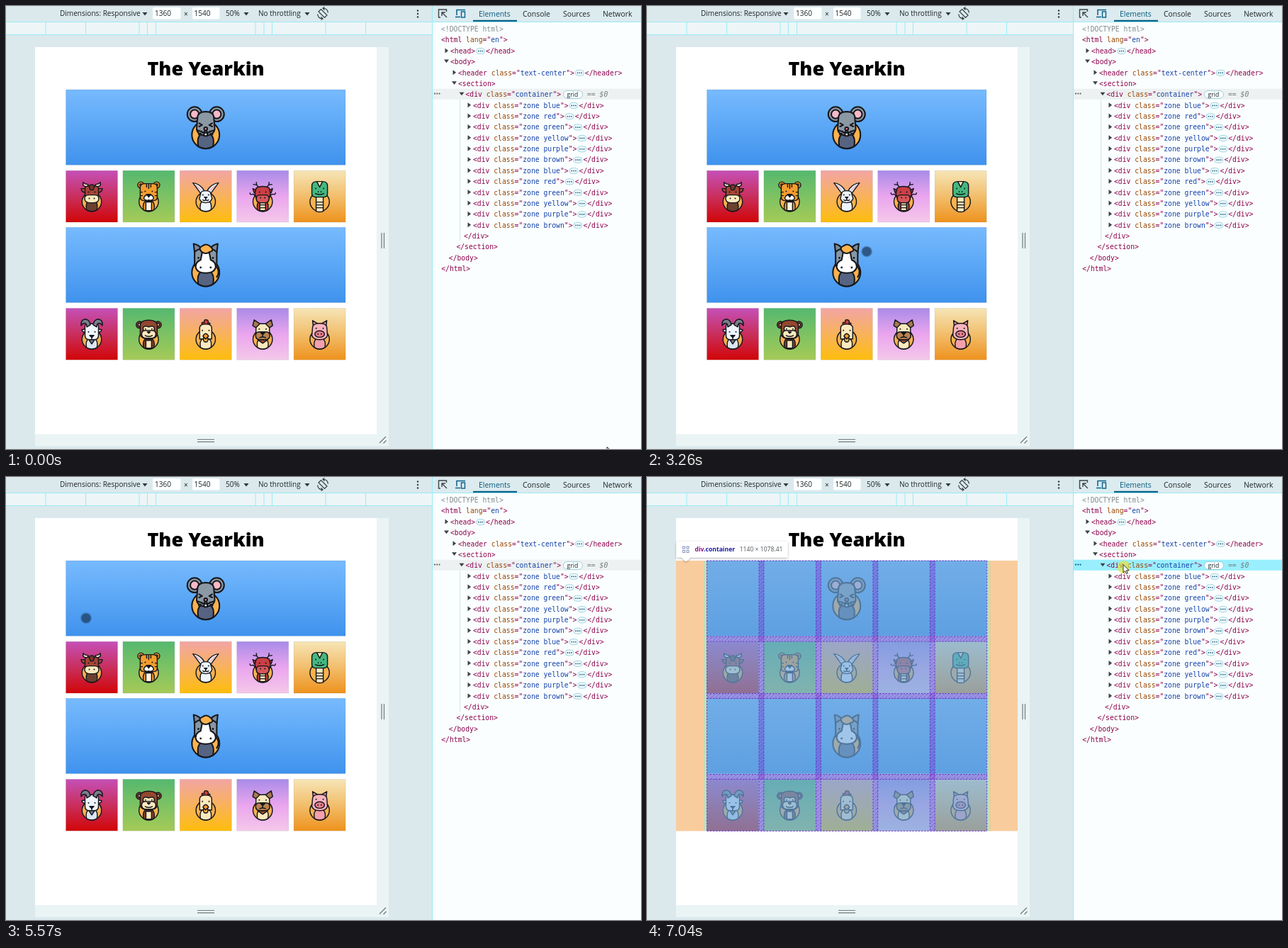
Write an HTML page that moves like this. It is 896 px wide and 625 px high and loops after 8 s.

```html
<!DOCTYPE html>
<html lang="en">
<head>
<meta charset="utf-8">
<title>Grid inspector</title>
<style>
html, body { margin: 0; width: 100%; height: 100%; overflow: hidden; background: #dbe9ed; }
svg { display: block; width: 896px; height: 625px; }
text { font: 10.05px "Open Sans", "Noto Sans", sans-serif; fill: #1f2528; white-space: pre; }
.tab { font-size: 10.4px; }
.code text { font: 9.72px "DejaVu Sans Mono", monospace; }
.title { font-size: 27px; font-weight: 800; fill: #000; }
.tip text { font-size: 8.6px; fill: #50565a; }
.tip .sel { font-weight: 700; }
.icon { stroke: #15171c; stroke-width: 1.45; stroke-linejoin: round; stroke-linecap: round; }
</style>
</head>
<body>
<svg id="stage" viewBox="0 0 896 625"></svg>
<script>
const LOOP = 8000, ROW0 = 32.7, ROW = 15.36;
const rect = (x, y, w, h, fill, more = '') =>
  `<rect x="${x}" y="${y}" width="${w}" height="${h}" fill="${fill}" ${more}/>`;
const path = (d, fill = 'none', more = '') => `<path d="${d}" fill="${fill}" ${more}/>`;
const disc = (x, y, r, fill, more = '') => `<circle cx="${x}" cy="${y}" r="${r}" fill="${fill}" ${more}/>`;
const line = (d, color, w = 1, more = '') => path(d, 'none', `stroke="${color}" stroke-width="${w}" ${more}`);
const text = (x, y, s, more = '') => `<text x="${x}" y="${y}" ${more}>${s}</text>`;
const esc = s => s.replace(/</g, '&lt;').replace(/>/g, '&gt;');
const span = (s, color) => `<tspan fill="${color}">${esc(s)}</tspan>`;
const rowY = i => ROW0 + ROW * i;

// ---- animal icons, centred on the origin ----
const INK = '#15171c', CREAM = '#fde9bd', GOLD = '#fbb24e';
const badge = disc(0, 7.5, 13.7, GOLD);
const body = fill => path('M-7.4 19Q-9 10 -5 7H5Q9 10 7.4 19Q0 23.4 -7.4 19Z', fill);
const head = fill => path('M-9.5 -11Q-9.5 -14.5 -5 -14.5H5Q9.5 -14.5 9.5 -11V2Q9.5 8 3 8H-3Q-9.5 8 -9.5 2Z', fill);
const dots = (dx, y, r = 1) => [-dx, dx].map(x => disc(x, y, r, INK, 'stroke="none"')).join('');
const pair = s => s + `<g transform="scale(-1 1)">${s}</g>`;
const muzzle = (fill, y = 2, w = 9) => path(`M${-w} ${y}Q${-w} ${y - 5} -4 ${y - 5}H4Q${w} ${y - 5} ${w} ${y}Q${w} ${y + 6} 3 ${y + 6}H-3Q${-w} ${y + 6} ${-w} ${y}Z`, fill);

const ICONS = {
  rat: badge + body('#566482') + pair(disc(-11, -13, 7.3, '#8c99a5') + disc(-11, -13, 4.3, '#f7b9c8')) +
    path('M-8 -11Q-7 -15.5 0 -15.5Q7 -15.5 8 -11L9 2Q8 8 0 8Q-8 8 -9 2Z', '#8c99a5') +
    pair(path('M-6.5 -4L-3.5 -2.3L-6.5 -.8') + path('M-5 4L-8 3M-5 6L-7 7')) +
    path('M-1.6 5.5H1.6V8.5H-1.6Z', '#fff') + path('M0 3Q-3 7 -4 4M0 3Q3 7 4 4') + disc(0, 1.5, 1.6, '#f3849d'),
  ox: badge + body('#6b4030') + pair(path('M-6 -14Q-14 -13 -12 -20Q-10 -17 -5 -17Z', '#f2e3cb') +
    path('M-9 -11L-15 -11Q-14 -5 -9 -6Z', '#b24a38')) + head('#a84436') +
    path('M-4 -14.5Q0 -19 4 -14.5L2 -9H-2Z', '#72382f') + dots(4.5, -6) + muzzle(CREAM, 3, 10) + dots(3.5, 3),
  tiger: badge + body('#f39a2c') + path('M-4 8H4V20H-4Z', '#fff5e5') +
    pair(disc(-11, -16, 4.5, '#f39a2c') + disc(-11, -16, 1.7, CREAM)) +
    path('M-12 -13Q-12 -18 -5 -18H5Q12 -18 12 -13V1Q12 6 7 6H-7Q-12 6 -12 1Z', '#f59d2e') +
    path('M-3 -17V-13M0 -17V-11M3 -17V-13M-12 -6H-9M12 -6H9M-12 -1H-9M12 -1H9') + dots(5, -7) +
    path('M-7 3Q-6 -3 0 -2Q6 -3 7 3Q4 7 0 5Q-4 7 -7 3Z', '#fff') + path('M-3 -3H3L0 1Z', INK),
  rabbit: badge + body('#eef4fb') + pair(path('M-7 -4L-18 -19Q-8 -18 -2 -8Z', '#eaf2fa') +
    path('M-7 -9L-13 -15', 'none', 'stroke="#f4a8b0"')) +
    path('M-7 -4Q-7 -8 0 -8Q7 -8 7 -4L9 3Q7 9 0 9Q-7 9 -9 3Z', '#eef4fb') + dots(4, -2) +
    path('M-2 1H2L0 3Z', '#e98c96') + path('M0 3V5M-4 5Q-2 7 0 5Q2 7 4 5'),
  dragon: badge + body('#c03a3e') + path('M-4 9H4V20H-4Z', CREAM) + path('M-4 12H4M-4 16H4') +
    pair(path('M-5 -13Q-9 -14 -9 -20M-8 -16L-13 -17') + path('M-9 -9L-14 -11L-12 -5L-9 -4Z', '#ae3038') +
    path('M-9 2Q-12 -4 -15 -3Q-18 -2 -18 -5')) +
    path('M-9 -12Q0 -16 9 -12L11 -4L8 7H-8L-11 -4Z', '#ca3f45') + dots(4.5, -6) + muzzle('#d9555a', 3) + dots(3, 2),
  snake: badge + path('M-5 0H5V21Q0 23 -5 21Z', CREAM) + path('M-5 8H5M-5 12H5M-5 16H5') +
    path('M-11 -15Q-11 -21 -4 -21H4Q11 -21 11 -15V-4Q11 1 6 1H-6Q-11 1 -11 -4Z', '#44b87f') +
    path('M-4 -21H4L0 -13Z', CREAM) + dots(5.5, -11) + path('M-6 -4Q0 -1 6 -4M-2 -7V-6M2 -7V-6'),
  horse: badge + body('#566482') + path('M10 1Q15 6 11 12', GOLD) +
    pair(path('M-11 -12L-12 -21Q-6 -20 -4 -15Z', '#7c8a97')) +
    path('M-11 -13Q-6 -17 0 -17Q6 -17 11 -13V0Q8 6 0 6Q-8 6 -11 0Z', '#8997a4') +
    path('M-3 -15H3L5 -5Q10 -3 10 2Q9 8 0 8Q-9 8 -10 2Q-10 -3 -5 -5Z', '#fff') +
    path('M-4 -13Q-8 -17 -3 -19Q1 -22 5 -18Q9 -14 4 -13Q0 -10 -4 -13Z', GOLD) + dots(7.2, -7) + dots(5, 2.5),
  goat: badge + body('#dce6f2') + pair(path('M-9 -7L-14 -6Q-13 -2 -9 -3Z', '#dce6f2')) + head('#edf4fc') +
    pair(path('M-2 -13Q-3 -20 -9 -21Q-16 -20 -15 -12Q-12 -16 -9 -15Q-7 -14 -7 -10Z', '#78818c')) +
    dots(4.5, -3) + path('M-3 2H3L0 5Z', INK) + path('M-4 8H4L0 14Z', '#77818d') + path('M0 5V7'),
  monkey: badge + body('#82432d') + path('M-4 9H4V20H-4Z', CREAM) +
    pair(disc(-13, -13, 4.7, '#94482f') + disc(-13, -13, 2.3, '#e8b791')) +
    path('M-12 -13Q-11 -19.5 0 -19.5Q11 -19.5 12 -13V1Q10 7 0 7Q-10 7 -12 1Z', '#93472f') +
    path('M-8 -8Q-7 -13 0 -10Q7 -13 8 -8L7 -3H-7Z', CREAM) + dots(4.5, -7) + muzzle(CREAM, 0, 10) +
    path('M-2 -3H2L0 -1Z', INK) + path('M-5 2Q0 5 5 2'),
  rooster: badge + body(CREAM) + path('M-5 -13Q-7 -18 -2 -16Q-3 -21 1 -20Q5 -19 3 -15Q8 -17 5 -12Z', '#cf3f3b') +
    path('M-8.5 -9Q-8 -14 0 -14Q8 -14 8.5 -9V7H-8.5Z', CREAM) + dots(4.7, -5) +
    path('M-3 5Q-4 12 0 11Q4 12 3 5L0 6Z', '#f3ad45') + path('M-4 3Q0 -4 4 3L0 7Z', '#f39b2d'),
  dog: badge + body(CREAM) + path('M-7 8L0 13L7 8L5 6H-5Z', '#ab4c35') + head(CREAM) +
    pair(path('M-4 -14.5L-12 -20L-14 -12L-9.5 -9Z', '#a87b50')) + dots(4.8, -7) + muzzle('#b8834f', 2, 10) +
    path('M-3 -2H3L0 1Z', INK) + path('M0 1V4M-4 5L0 4L4 5'),
  pig: badge + body('#f4a0ad') + pair(path('M-9 -10L-10 -19L-3 -15Z', '#f2909f')) +
    path('M-10 -10Q-9 -15 0 -15Q9 -15 10 -10L11 2Q9 8 0 8Q-9 8 -11 2Z', '#f8b3bf') + dots(5, -8) +
    `<ellipse cx="0" cy="0" rx="6.8" ry="4.6" fill="#ea7f90"/>` + dots(2.3, 0)
};

// ---- zones ----
const COLORS = {
  blue: ['#77bafe', '#5ba7f6', '#3f92ed'], red: ['#c550b8', '#c92f5d', '#d10507'],
  green: ['#55b86f', '#7dc263', '#a5ca57'], yellow: ['#f2a5a4', '#f8b25b', '#febd0c'],
  purple: ['#a98be8', '#eaa5ee', '#f5c8ea'], brown: ['#f6e5b6', '#f2be6c', '#ee921d']
};
const names = Object.keys(COLORS);
const colX = i => 84.5 + i * 80.4;
const zones = Object.keys(ICONS).map((icon, i) => {
  const big = i % 6 === 0, half = i < 6 ? 0 : 194.2;
  return { icon, big, cls: names[i % 6], x: big ? 84.5 : colX(i % 6 - 1),
    y: (big ? 118 : 232.2) + half, w: big ? 394.5 : 73, h: big ? 106.3 : 72.8 };
});
const gradients = names.map(n => `<linearGradient id="${n}" x2="0" y2="1">` +
  COLORS[n].map((c, i) => `<stop offset="${i / 2}" stop-color="${c}"/>`).join('') + '</linearGradient>').join('');
const drawZone = z => rect(z.x, z.y, z.w, z.h, `url(#${z.cls})`, 'stroke="#54606a" stroke-opacity=".2" stroke-width=".6"') +
  `<g class="icon" transform="translate(${z.x + z.w / 2} ${z.y + z.h / 2}) scale(${z.big ? 1.42 : 1})">${ICONS[z.icon]}</g>`;

// ---- device toolbar and page frame ----
const caret = x => path(`M${x - 3.5} 9h7l-3.5 4.5z`, '#30383c');
const cyan = '#9aebf5';
function device() {
  const ticks = [56, 112.5, 188, 199.5, 211.5].flatMap(x => [x, 563.5 - x]);
  return rect(0, 0, 601, 625, '#dbe9ed') + rect(0, 22, 601, 18, '#edf5f7') +
    line('M0 22.5H601M0 40.5H601', cyan) + line(ticks.map(x => `M${x} 22V40`).join(''), cyan) +
    text(76, 14.3, 'Dimensions: Responsive') + caret(196) +
    rect(207, 2, 39.5, 16.5, '#fcffff', 'rx="2"') + text(210, 14.3, '1360') +
    text(251, 15, '×') + rect(263, 2, 38.5, 16.5, '#fcffff', 'rx="2"') + text(265.5, 14.3, '1540') +
    text(310, 14.3, '50%') + caret(339) + text(356, 14.3, 'No throttling') + caret(425) +
    `<g transform="translate(447 10.5)">` +
    line('M-6 -2.5L-2.5 -6L6 2.5L2.5 6ZM0 -7.5Q7 -7 7.3 -1M0 7.5Q-7 7 -7.3 1M2.5 -9L0 -7.5L2.5 -5M-2.5 9L0 7.5L-2.5 5', '#30383c', 1.2) + '</g>' +
    [6.5, 11, 15.5].map(y => disc(581, y, 1.2, '#30383c')).join('') +
    rect(41, 58, 499, 563, '#eaf4f5') + rect(41, 58, 482, 546, '#fff') +
    line('M530 320V342M533.5 320V342M270 611.5H294M270 614.8H294M527 616.5L536 607.5M532.5 617L536.5 613', '#71797c', 1.2);
}

// ---- element tree ----
const markup = s => s.split(/("[^"]*"|\b(?:class|lang)=)/).map(p =>
  p[0] === '"' ? span('"', '#8e004b') + span(p.slice(1, -1), '#1440a8') + span('"', '#8e004b') :
  /=$/.test(p) ? span(p.slice(0, -1), '#994500') + span('=', '#8e004b') : span(p, '#8e004b')).join('');
const CH = 5.85;
function row(i, x, s, fold, close) {
  const y = rowY(i), end = x + s.length * CH;
  let out = text(x, y + 3.4, markup(s));
  if (fold) out += path(fold === 'open' ? `M${x - 9} ${y - 3.2}h7l-3.5 4.6z` : `M${x - 7.5} ${y - 4}v7l4.6 -3.5z`, '#3c4346');
  if (close) out += rect(end + 1.5, y - 3.8, 12, 8, '#effbff', 'rx="4" stroke="#8fc9da" stroke-width=".8"') +
    [-2.8, 0, 2.8].map(d => disc(end + 7.5 + d, y + .2, .9, '#17607d')).join('') + text(end + 15, y + 3.4, markup(close));
  return out;
}
function panel() {
  const tabs = [[667, 'Elements'], [729, 'Console'], [786, 'Sources'], [842, 'Network']];
  const cy = rowY(6);
  return rect(601, 0, 295, 625, '#fafefe') + rect(601, 0, 295, 22, '#dcebef') +
    line('M601 22.5H896M601.5 0V625', cyan) + rect(659, 19.8, 62, 2.2, '#08628a') +
    tabs.map(([x, s], i) => text(x, 15.4, s, 'class="tab"' + (i ? '' : ' style="fill:#07597e"'))).join('') +
    line('M613 16H610.5V5H621.5V8M615 9L622 16M615 14V9H620', '#3c464a', 1.4) +
    line('M637 15.5H634M636 13V5.5H648M634 15.5H641', '#07628a', 1.5) + rect(642.5, 8, 5, 8, 'none', 'stroke="#07628a" stroke-width="1.4"') +
    rect(602, cy - 8.2, 294, 15.2, '#edf1f1', 'id="selected"') +
    rect(605, 0, 291, 14.8, '#eef3f4', 'id="hover" rx="3"') +
    line('M640.5 132.5V331', '#d3e3e6', 1, 'id="guide"') +
    `<g id="more" fill="#5c6669">` + [605, 608.3, 611.6].map(x => `<circle cx="${x}" cy="${cy - 1.3}" r="1.1"/>`).join('') + '</g>' +
    '<g class="code">' + text(614, rowY(0) + 3.4, esc('<!DOCTYPE html>'), 'style="fill:#858b8e"') +
    row(1, 614, '<html lang="en">') + row(2, 627, '<head>', 'shut', '</head>') + row(3, 627, '<body>', 'open') +
    row(4, 638, '<header class="text-center">', 'shut', '</header>') + row(5, 638, '<section>', 'open') +
    row(6, 648.5, '<div class="container">', 'open') +
    zones.map((z, i) => row(7 + i, 659, `<div class="zone ${z.cls}">`, 'shut', '</div>')).join('') +
    ['</div>', '</section>', '</body>', '</html>'].map((s, i) => row(19 + i, 646 - i * 10.6, s)).join('') +
    text(820, cy + 3.4, '== $0', 'style="fill:#777e82;font-style:italic"') + '</g>' +
    rect(786.5, cy - 5.5, 27, 11, '#f8feff', 'rx="5.5" stroke="#9ccbd8" stroke-width=".9"') +
    text(791.5, cy + 2.8, 'grid', 'style="font-size:8.6px"');
}

// ---- highlight overlays ----
const CONTENT = 'rgba(111,168,220,.66)', PURPLE = 'rgba(127,32,210,.3)';
function tip(x, y, w, cls, size, grid) {
  const tx = x + (grid ? 25 : 6.5), px = x + 12.5;
  let out = path(`M${x} ${y}h${w}v20.5H${px + 6}L${px} ${y + 26}L${px - 6} ${y + 20.5}H${x}Z`, '#fff', 'filter="url(#shade)" stroke="#fff" stroke-linejoin="round" stroke-width="2"');
  if (grid) for (const d of [0, 5.5]) for (const e of [0, 5.5])
    out += rect(x + 8 + d, y + 6 + e, 3, 3, 'none', 'stroke="#7d8cb8" stroke-width=".9"');
  return '<g class="tip">' + out + `<text class="sel" x="${tx}" y="${y + 13.3}">${span('div', '#881280')}${span(cls, '#1a1aa6')}</text>` +
    text(x + w - 6, y + 13.3, size, 'text-anchor="end"') + '</g>';
}
function gridOverlay() {
  const top = 118, bottom = 499.5, left = 84.5, right = 480;
  const xs = [0, 1, 2, 3, 4].flatMap(i => [colX(i), colX(i) + 73.6]);
  const ys = [118, 225, 232, 305.5, 312.5, 419.5, 426.5, bottom];
  const gap = (x, y, w, h) => rect(x, y, w, h, PURPLE) + rect(x, y, w, h, 'url(#hatch)');
  let out = '';
  for (const x of [41, 484]) out += rect(x, top, 39, bottom - top, 'rgba(246,178,107,.66)');
  for (const x of [80, right]) out += rect(x, top, 4.3, bottom - top, 'rgba(147,196,125,.55)');
  out += rect(left, top, right - left, bottom - top, CONTENT);
  for (let i = 1; i < 9; i += 2) out += gap(xs[i], top, xs[i + 1] - xs[i], bottom - top);
  for (let i = 1; i < 7; i += 2) out += gap(left, ys[i], right - left, ys[i + 1] - ys[i]);
  out += line(xs.map(x => `M${x} ${top}V${bottom}`).join('') + ys.map(y => `M${left} ${y}H${right}`).join(''),
    '#6d2cc4', .9, 'stroke-dasharray="2.4 1.8"');
  return out + tip(42.5, 92, 155, '.container', '1140 × 1078.41', true);
}
const zoneOverlay = z => rect(z.x, z.y, z.w, z.h, CONTENT) +
  tip(z.x + .5, z.y - 26, z.big ? 132 : 140, '.zone.' + z.cls, z.big ? '1115.98 × 302' : '206.39 × 206.39');

const stage = document.getElementById('stage');
stage.innerHTML = `<defs>${gradients}
  <pattern id="hatch" width="6" height="6" patternUnits="userSpaceOnUse">${line('M0 6L6 0', 'rgba(110,25,200,.45)', .9, 'stroke-dasharray="4 1.5"')}</pattern>
  <filter id="shade" x="-10%" y="-30%" width="120%" height="170%"><feDropShadow dx="0" dy="1" stdDeviation="1.6" flood-opacity=".35"/></filter></defs>` +
  device() + text(282, 98, 'The Yearkin', 'class="title" text-anchor="middle"') +
  zones.map(drawZone).join('') + '<g id="overlay"></g>' + panel() +
  `<g id="touch">${disc(0, 0, 8, 'rgba(35,65,100,.3)')}${disc(0, 0, 6.6, 'rgba(32,65,102,.7)')}</g>` +
  `<g id="arrow">${disc(.7, 3.5, 9, 'rgba(232,224,50,.65)', 'id="halo"')}` +
  path('M0 0V11.5L2.7 9L4.5 13L6.3 12.2L4.5 8.3H8.2Z', '#fff', 'stroke="#1a1a1a" stroke-width=".9"') + '</g>';

const $ = id => document.getElementById(id);
const show = (el, on) => el.setAttribute('display', on ? 'inline' : 'none');
const overlays = [gridOverlay(), ...zones.map(zoneOverlay)];

// time, x, y of the pointer
const KEYS = [
  [0, 848, 622], [20, 848, 622], [790, 357, 371], [1010, 357, 371], [1180, 400, 403], [1320, 443, 378],
  [1400, 443, 378], [1540, 462, 388], [1890, 320, 369], [2119, 320, 369], [2120, 137, 378], [2270, 123, 374],
  [2430, 123, 374], [2500, 116, 386], [2660, 116, 386], [2830, 140, 418], [3260, 310, 347], [3490, 323, 220],
  [3540, 323, 220], [3640, 331, 190], [3890, 331, 190], [4720, 467, 203], [4740, 467, 203], [4950, 355, 194],
  [5570, 113, 199], [5610, 113, 199], [5710, 88, 196], [5780, 88, 196], [6250, 833, 175], [6510, 690, 143],
  [6580, 690, 143], [6650, 643, 137], [6719, 643, 137], [6800, 672, 123.5], [LOOP, 672, 123.5]
];
function pointer(t) {
  const i = KEYS.findIndex(k => k[0] > t), a = KEYS[i - 1], b = KEYS[i];
  const f = (t - a[0]) / (b[0] - a[0]);
  return [a[1] + (b[1] - a[1]) * f, a[2] + (b[2] - a[2]) * f];
}

let shown = -1;
function update(t) {
  const [x, y] = pointer(t);
  const onPage = x > 41 && x < 523 && y > 58 && y < 604;
  const visible = t < 1890 || t >= 2120;
  show($('touch'), visible && onPage);
  show($('arrow'), visible && !onPage);
  for (const id of ['touch', 'arrow']) $(id).setAttribute('transform', `translate(${x} ${y})`);

  const over = Math.round((y - ROW0) / ROW);
  const target = x > 602 && over >= 6 && over <= 18 ? over - 6 : -1;
  if (target !== shown) {
    $('overlay').innerHTML = target < 0 ? '' : overlays[target];
    shown = target;
  }
  show($('hover'), target > 0);
  $('hover').setAttribute('y', rowY(over) - 7.3);

  const picked = t >= 6950;
  $('selected').setAttribute('fill', picked ? '#99effd' : '#edf1f1');
  $('more').setAttribute('fill', picked ? '#07628a' : '#5c6669');
  show($('guide'), !picked);
  show($('halo'), picked);
}

const start = performance.now();
function tick() {
  update((performance.now() - start) % LOOP);
  requestAnimationFrame(tick);
}
update(0);
tick();
</script>
</body>
</html>
```
